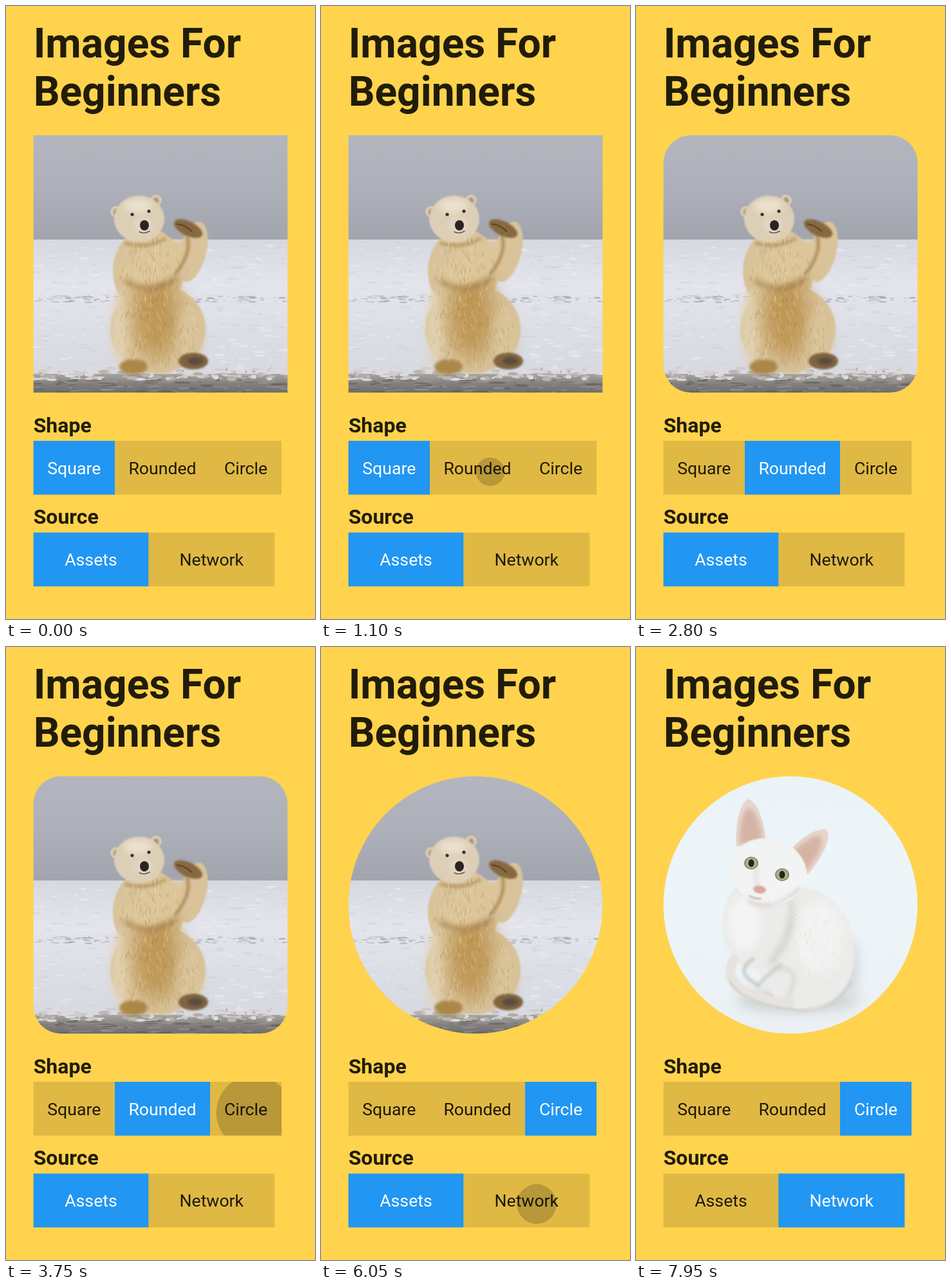
Animation, 480 px wide and 953 px high, one loop 8 s. Source, as an HTML page with a canvas:

```html
<!DOCTYPE html>
<html lang="en">
<head>
<meta charset="utf-8">
<title>Images For Beginners</title>
<style>
html, body { margin: 0; width: 100%; height: 100%; overflow: hidden; background: #ffd34d; }
canvas { display: block; width: 480px; height: 953px; }
</style>
</head>
<body>
<canvas id="stage" width="480" height="953"></canvas>
<script>
const W = 480, H = 953, LOOP = 8000, LEFT = 42.67;
const PIC = { x: LEFT, y: 201, w: 394.67, h: 400 };
const ctx = document.getElementById('stage').getContext('2d');
const clamp = v => Math.max(0, Math.min(1, v));

let seed = 7;
const rnd = (a, b) => {
  seed = (seed * 16807) % 2147483647;
  return a + (b - a) * seed / 2147483647;
};

// Paint helpers for the two pictures
function painter(g) {
  const soft = (blur, paint) => {
    g.filter = blur ? `blur(${blur}px)` : 'none';
    paint();
    g.filter = 'none';
  };
  const tools = {
    band(y, h, ...colors) {
      const grad = g.createLinearGradient(0, y, 0, y + h);
      colors.forEach((c, i) => grad.addColorStop(i / (colors.length - 1), c));
      g.fillStyle = grad;
      g.fillRect(0, y, W, h);
    },
    oval(x, y, rx, ry, color, blur = 0, turn = 0) {
      g.beginPath();
      g.ellipse(x, y, rx, ry, turn, 0, 7);
      g.fillStyle = color;
      soft(blur, () => g.fill());
    },
    curve(x0, y0, cx, cy, x1, y1, color, width, blur = 0) {
      g.beginPath();
      g.moveTo(x0, y0);
      g.quadraticCurveTo(cx, cy, x1, y1);
      g.lineCap = 'round';
      g.lineWidth = width;
      g.strokeStyle = color;
      soft(blur, () => g.stroke());
    },
    // Pointed ear standing on (x, y), leaning by turn
    ear(x, y, size, turn, color, blur) {
      g.save();
      g.translate(x, y);
      g.rotate(turn);
      g.scale(size, size);
      g.beginPath();
      g.moveTo(-.42, .3);
      g.quadraticCurveTo(-.38, -.8, 0, -1);
      g.quadraticCurveTo(.38, -.8, .42, .3);
      g.fillStyle = color;
      soft(blur, () => g.fill());
      g.restore();
    },
    // Short hairs spread over an oval
    fur(n, x, y, rx, ry, colors) {
      for (let i = 0; i < n; i++) {
        const a = rnd(0, 6.28), r = Math.sqrt(rnd(0, .85));
        const hx = x + rx * r * Math.cos(a), hy = y + ry * r * Math.sin(a);
        tools.curve(hx, hy, hx + rnd(-2, 2), hy + 3, hx + rnd(-3, 3), hy + 7, colors[i % colors.length], 1);
      }
    },
    // Flat flakes spread over a strip of ground
    flakes(n, y0, y1, rx, ry, colors) {
      for (let i = 0; i < n; i++) {
        tools.oval(rnd(40, 440), rnd(y0, y1), rnd(1, rx), rnd(.5, ry), colors[i % colors.length]);
      }
    }
  };
  return tools;
}

function picture(paint) {
  const c = document.createElement('canvas');
  c.width = W;
  c.height = H;
  paint(painter(c.getContext('2d')));
  return c;
}

const bear = picture(({ band, oval, curve, fur, flakes }) => {
  band(200, 165, '#b3b6be', '#adb0b9', '#a2a4ad');
  band(363, 212, '#d6d8e0', '#e4e5ec', '#dcdee6', '#d8d9e0');
  flakes(350, 370, 565, 10, 2, ['#eeeff480', '#cfd1da70']);
  flakes(100, 450, 461, 7, 1.3, ['#9d9ea6a0', '#c1c2ca']);
  band(572, 30, '#a8a4a0', '#83807e', '#6d6c70');
  flakes(90, 580, 602, 14, 1.8, ['#5c5a5c90', '#a09c9880']);
  flakes(100, 562, 581, 11, 3.5, ['#cfcccb', '#b9b4b0', '#dddbdd']);

  const coat = '#d9c39b', shade = '#a58250';
  oval(290, 382, 21, 48, coat, 1, .25);
  oval(221, 412, 55, 66, coat, 1);
  oval(236, 502, 74, 69, coat, 1);
  oval(178, 500, 13, 60, '#e2d3b4', 7);
  oval(233, 480, 36, 70, '#bf9856', 15);
  oval(286, 512, 18, 40, '#d8c297', 7);
  oval(232, 402, 62, 28, '#dcc598', 4, -.45);
  curve(186, 428, 225, 452, 264, 424, shade, 6, 4);
  curve(280, 354, 291, 380, 264, 416, shade, 4, 2);
  curve(186, 369, 220, 378, 247, 362, '#b7965f', 4, 2);
  oval(283, 346, 24, 11, '#87683f', 1.5, .45);
  curve(266, 339, 278, 340, 288, 350, '#55422c', 2, .6);

  for (const [x, y] of [[171, 320], [233, 302]]) {
    oval(x, y, 9, 9, '#d8cab0', .6);
    oval(x, y + 1, 4, 5, '#a18f78', 1.5);
  }
  oval(207, 331, 39, 36, '#ddcfb5', 1);
  oval(205, 311, 22, 11, '#eae0cd', 5);
  oval(213, 341, 15, 13, '#e2d6c4', 3);
  oval(215, 341, 7, 8, '#2b2421', .7);
  curve(207, 351, 215, 355, 223, 350, '#6a5949', 1.5, .7);
  oval(196, 324, 2.6, 2.6, '#3a2f26', .5);
  oval(222, 319, 2.6, 2.6, '#3a2f26', .5);

  oval(198, 561, 22, 12, '#ab8849', 2);
  oval(291, 552, 23, 13, '#80653f', 1.5);
  oval(294, 552, 12, 6, '#594b41', 2);
  fur(170, 222, 412, 53, 60, ['#f2e4c450', '#8f6a3340']);
  fur(220, 236, 500, 70, 62, ['#f2e4c450', '#8f6a3340']);
  flakes(30, 570, 580, 9, 2.5, ['#cfccca', '#b3ada6']);
});

const cat = picture(({ band, oval, curve, ear, fur }) => {
  band(200, 402, '#eaf3f7', '#eef5f9', '#eaf0f3');
  oval(250, 550, 95, 18, '#d0d3d3', 9);
  oval(334, 500, 12, 45, '#d5dadd', 8);

  const coat = '#ebebe9', crease = '#cbc8c3';
  oval(182, 430, 47, 70, coat, 1);
  oval(262, 470, 77, 96, coat, 1.5, -.12);
  oval(285, 450, 38, 58, '#f2f2f1', 9);
  oval(168, 430, 25, 42, '#f3f4f4', 7);
  curve(240, 395, 250, 440, 210, 490, '#d2d1cd', 9, 5);
  curve(215, 500, 265, 495, 232, 552, '#d6d5d2', 5, 3);
  curve(182, 485, 150, 505, 190, 526, crease, 5, 2);
  curve(226, 494, 206, 507, 190, 526, crease, 4, 2);
  curve(152, 486, 125, 540, 240, 555, '#e7e3de', 15, 1);
  curve(146, 520, 165, 556, 260, 565, crease, 2, 1.5);
  curve(260, 565, 312, 562, 334, 520, crease, 3, 2);
  fur(120, 285, 465, 40, 70, ['#ffffff60', '#cfcecb50']);

  for (const [x, y, turn] of [[178, 292, -.06], [260, 326, .72]]) {
    ear(x, y, 56, turn, '#e8d6cd', .7);
    ear(x, y, 42, turn, '#d5b4a5', 3);
  }
  oval(206, 349, 60, 51, '#f2f3f3', 1, .3);
  curve(175, 395, 208, 414, 254, 376, '#d3d0ce', 4, 3);
  curve(188, 345, 183, 360, 190, 373, '#e1dedc', 5, 3);
  for (const [x, y] of [[179, 336], [227, 354]]) {
    oval(x, y, 11, 10, '#8b8579', .7);
    oval(x, y, 9, 8.5, '#b1b083', .4);
    oval(x, y, 4.5, 6, '#242620', .4);
  }
  oval(192, 377, 10, 6, '#dba99b', 1, .15);
  curve(176, 387, 186, 392, 194, 391, '#c9a69d', 2, .8);
  for (let i = 0; i < 5; i++) {
    curve(208, 386 + i * 2, 235, 385 + i * 7, 250, 398 + i * 8, '#ffffffb0', .8);
  }
});

const BAR = 83.6, GAP = 142.67, CAT_AT = 7150;
const start0 = { up: -1e4, i: 0 };
// Picks: release time, button, press time, touch point
const rows = [
  { top: 676, title: 'Shape', names: ['Square', 'Rounded', 'Circle'], edges: [LEFT, 169, 317, 428],
    picks: [start0, { up: 1940, i: 1, down: 890, x: 263, y: 724 }, { up: 3950, i: 2, down: 3050, x: 385, y: 724 }] },
  { top: 676 + GAP, title: 'Source', names: ['Assets', 'Network'], edges: [LEFT, 221.3, 417.3],
    picks: [start0, { up: 6790, i: 1, down: 5800, x: 335, y: 866 }] }
];

const current = (row, t) => row.picks.filter(p => p.up <= t).length - 1;

function splash({ top, edges }, { up, i, down, x, y }, t) {
  if (down === undefined || t < down || t > up + 200) return;
  const l = edges[i], r = edges[i + 1];
  const grow = clamp((Math.min(t, up) - down) / 1000 + Math.max(0, t - up) / 60);
  const reach = Math.hypot(Math.max(x - l, r - x), Math.max(y - top, top + BAR - y));
  const alpha = .18 * clamp((t - down) / 75) * (1 - clamp((t - up) / 200));
  ctx.save();
  ctx.beginPath();
  ctx.rect(l, top, r - l, BAR);
  ctx.clip();
  ctx.beginPath();
  ctx.arc(x, y, grow * reach, 0, 7);
  ctx.fillStyle = `rgba(0,0,0,${alpha})`;
  ctx.fill();
  ctx.restore();
}

function drawRow(row, t) {
  const { top, edges, picks } = row, k = current(row, t);
  const on = picks[k].i, was = k ? picks[k - 1].i : -1;
  const fade = clamp((t - picks[k].up) / 200);
  ctx.fillStyle = 'rgba(0,0,0,.87)';
  ctx.font = 'bold 32px Roboto, sans-serif';
  ctx.textAlign = 'left';
  ctx.fillText(row.title, LEFT, Math.round(top - 13.4));
  ctx.fillStyle = '#e0b944';
  ctx.fillRect(edges[0], top, edges[edges.length - 1] - edges[0], BAR);
  ctx.fillStyle = '#2196f3';
  ctx.fillRect(edges[on], top, edges[on + 1] - edges[on], BAR);
  picks.forEach(p => splash(row, p, t));
  ctx.font = '26.67px Roboto, sans-serif';
  ctx.textAlign = 'center';
  row.names.forEach((name, i) => {
    const m = i === on ? fade : i === was ? 1 - fade : 0, v = Math.round(255 * m);
    ctx.fillStyle = `rgba(${v},${v},${v},${.87 + .13 * m})`;
    ctx.fillText(name, (edges[i] + edges[i + 1]) / 2, Math.round(top + 51.7));
  });
}

function drawPicture(t) {
  const { x, y, w, h } = PIC, shape = current(rows[0], t);
  const network = current(rows[1], t) === 1;
  if (network && t < CAT_AT) return;
  ctx.save();
  ctx.beginPath();
  if (shape === 2) ctx.ellipse(x + w / 2, y + h / 2, w / 2, h / 2, 0, 0, 7);
  else ctx.roundRect(x, y, w, h, shape * 42.67);
  ctx.clip();
  ctx.drawImage(network ? cat : bear, 0, 0);
  ctx.restore();
}

function draw(t) {
  ctx.fillStyle = '#ffd34d';
  ctx.fillRect(0, 0, W, H);
  ctx.fillStyle = 'rgba(0,0,0,.87)';
  ctx.font = 'bold 64px Roboto, sans-serif';
  ctx.textAlign = 'left';
  ctx.fillText('Images For', LEFT, 80);
  ctx.fillText('Beginners', LEFT, 155);
  drawPicture(t);
  rows.forEach(r => drawRow(r, t));
}

const start = performance.now();
function tick() {
  draw((performance.now() - start) % LOOP);
  requestAnimationFrame(tick);
}
tick();
</script>
</body>
</html>
```
